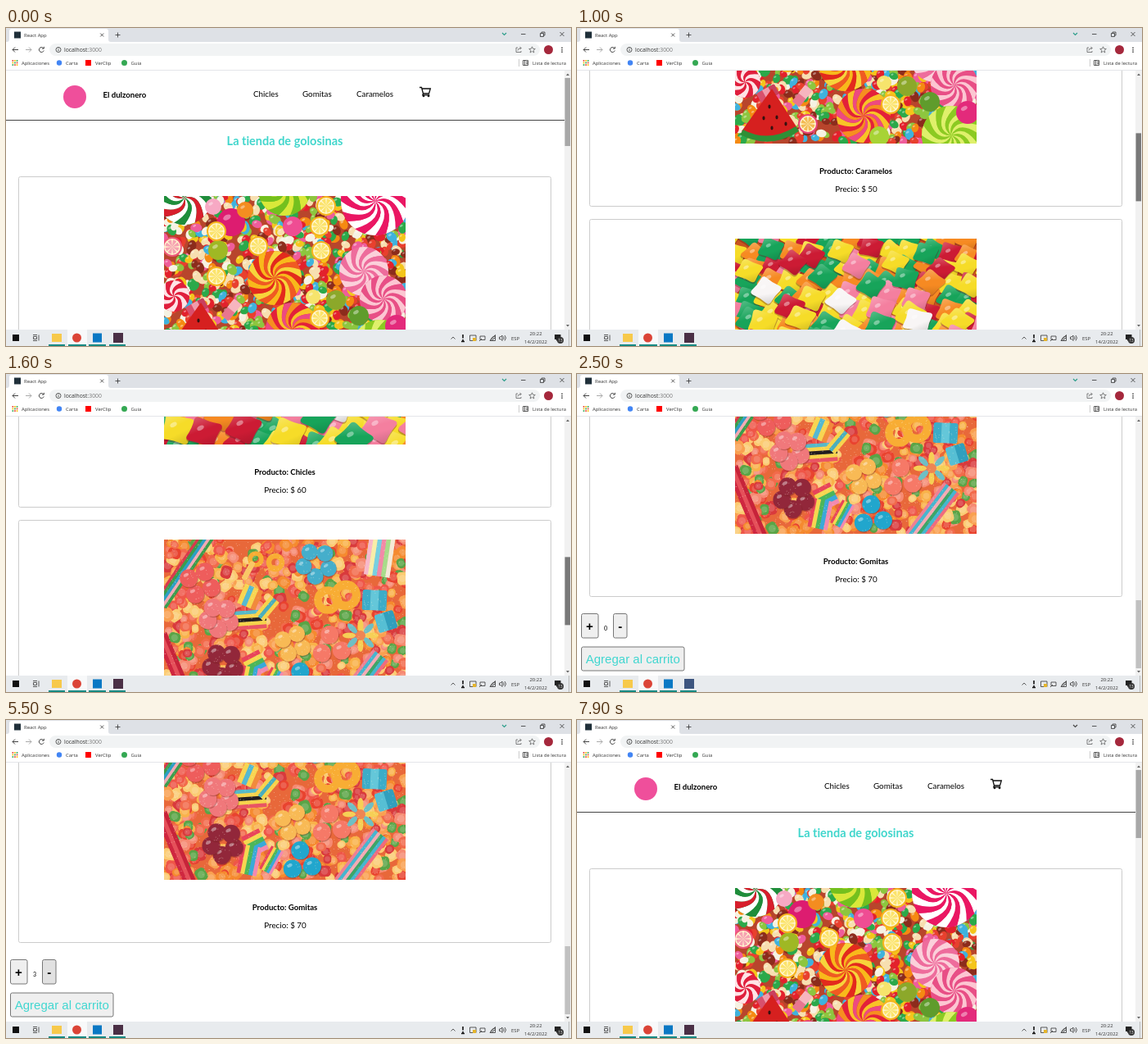
These frames come from a looping animation (690 by 388 pixels, 8 s). An HTML page with a canvas:

```html
<!DOCTYPE html>
<html lang="es">
<head>
<meta charset="utf-8">
<title>Golosinas</title>
<style>
html, body { margin: 0; width: 690px; height: 388px; overflow: hidden; background: #fff; }
svg, canvas, div { position: absolute; left: 0; top: 0; }
#view { top: 52px; width: 682px; height: 316px; overflow: hidden; }
#page { top: -52px; width: 682px; height: 1200px; will-change: transform; }
canvas { left: 193px; }
.shop { font: 9.8px Lato, "Open Sans", sans-serif; font-variant-ligatures: none; }
.shop .b { font-weight: 700; font-size: 9.6px; }
.ui { font: 5.9px "Open Sans", "Noto Sans", sans-serif; fill: #333; }
.btn { font: 700 15px "Liberation Sans", Arial, sans-serif; }
.line { fill: none; stroke: #444; stroke-width: 1; }
.thin { fill: none; stroke: #333; stroke-width: .8; }
.mid { text-anchor: middle; }
</style>
</head>
<body>
<div id="view">
  <div id="page">
    <svg class="shop" width="682" height="1200">
      <circle cx="84" cy="84" r="14" fill="#ef4f9b"/>
      <text class="b" x="118.5" y="84.5">El dulzonero</text>
      <text x="302" y="83.5">Chicles</text>
      <text x="362" y="83.5">Gomitas</text>
      <text x="428" y="83.5">Caramelos</text>
      <g fill="none" stroke="#111" stroke-width="1.3">
        <path d="M505 72.5h2.5l2 7.500h7l1.800-6H508M509.500 80l-.7 1.800h8.500"/>
        <circle cx="510" cy="83" r=".7"/><circle cx="516" cy="83" r=".7"/>
      </g>
      <path d="M0 112.500H682" stroke="#444"/>
      <text class="mid" x="340.500" y="143" style="font-size:14.5px;font-weight:700" fill="#40d6cc">La tienda de golosinas</text>
      <g id="cards"></g>
      <g stroke="#777">
        <rect id="plus" x="5.500" y="1125.500" width="20.500" height="29.500" rx="2"/>
        <rect id="minus" x="44.500" y="1125.500" width="16.500" height="29.500" rx="2"/>
        <rect x="5.500" y="1166" width="125.500" height="29" rx="2" fill="#efefef"/>
      </g>
      <g class="btn mid">
        <text x="15.500" y="1145.500">+</text>
        <text x="52.800" y="1145.500">-</text>
        <text x="68.300" y="1186" fill="#40d6d0" style="font-weight:400">Agregar al carrito</text>
      </g>
      <text id="count" class="mid" x="35" y="1145.500" style="font-size:7px">0</text>
    </svg>
  </div>
</div>

<svg class="ui" width="690" height="388">
  <!-- browser frame -->
  <rect width="690" height="17" fill="#dee1e6"/>
  <path d="M1 17q3 0 3-3V4q0-3 3-3H122q3 0 3 3v10q0 3 3 3z" fill="#fff"/>
  <rect x="10" y="4.500" width="8" height="8" fill="#20303a"/>
  <text x="22" y="10.700">React App</text>
  <path class="thin" d="M115.200 6.500l4 4m0-4l-4 4M133.500 8.500h6m-3-3v6"/>
  <path id="chevron" d="M606 6l2.500 2.500L611 6" fill="none" stroke-width="1.100"/>
  <path class="thin" d="M629 7.500h5.500M652.500 6.500h4v4h-4zM654 6.500V5h4v4h-1.500M676.500 5l5 5m0-5l-5 5"/>
  <rect y="17" width="690" height="35" fill="#fff"/>
  <rect x="53" y="19" width="599" height="15" rx="7.500" fill="#f1f3f4"/>
  <path class="line" d="M15 26.500H8m3-3l-3 3 3 3"/>
  <path class="line" d="M24 26.500h7m-3-3l3 3-3 3" style="stroke:#aaa"/>
  <path class="line" d="M45.600 24.500a3 3 0 1 0 .6 3M46.300 22.800v2.300H44"/>
  <circle class="thin" cx="64" cy="26.500" r="3"/>
  <path class="thin" d="M64 26v2M64 24.500v.8"/>
  <text x="71" y="28.800" style="font-size:6.800px">localhost<tspan fill="#777">:3000</tspan></text>
  <g style="opacity:.75">
    <path class="thin" d="M625 24h-2v5.500h6V28M625 27.500q0-3 4-3m-1.500-1.700l1.700 1.700-1.700 1.700"/>
    <path class="thin" d="M642.500 22.800l1.100 2.500 2.700.2-2.100 1.800.7 2.700-2.400-1.500-2.400 1.500.7-2.700-2.100-1.800 2.700-.2z"/>
  </g>
  <circle cx="662.500" cy="26.500" r="5.500" fill="#a5283c"/>
  <path d="M679 23.500v6.500" stroke="#444" stroke-width="1.500" stroke-dasharray="1.500 1"/>
  <g id="apps"></g>
  <text x="19" y="44.700">Aplicaciones</text>
  <circle cx="65" cy="42.500" r="3.200" fill="#4285f4"/>
  <text x="73" y="44.700">Carta</text>
  <rect x="97" y="39" width="7" height="7" fill="#f00"/>
  <text x="109" y="44.700">VerClip</text>
  <circle cx="144.500" cy="42.500" r="3.500" fill="#34a853"/>
  <text x="152.500" y="44.700">Guia</text>
  <path d="M626.500 38v9" stroke="#ccc"/>
  <path class="thin" d="M631.500 39.500h6v6h-6zM633.500 39.500v6M635 41.500h2.500M635 43.500h2.500"/>
  <text x="643" y="44.700" style="font-size:5.800px">Lista de lectura</text>
  <path d="M0 51.500H690" stroke="#e4e6e9"/>

  <!-- scrollbar -->
  <rect x="682" y="52" width="8" height="316" fill="#f1f1f1"/>
  <path d="M684 58l2-2.500 2 2.500zM684 362l2 2.500 2-2.500z" fill="#666"/>
  <rect id="thumb" x="682.500" y="61" width="6.500" height="83"/>

  <!-- taskbar -->
  <rect y="368" width="690" height="20" fill="#e8ebee"/>
  <rect x="75" y="368" width="24" height="20" fill="#f8f9fa"/>
  <rect x="8" y="374" width="8" height="8" fill="#111"/>
  <path class="thin" d="M33.500 376.500h4v3h-4zM33 374.500h5M33 381.500h5M40 374.500v7"/>
  <rect x="56" y="373" width="12" height="10" fill="#f7c94b"/>
  <circle cx="86.500" cy="378" r="5.500" fill="#db4437"/>
  <rect x="106" y="372.500" width="11" height="11" fill="#0a78c4"/>
  <rect id="recorder" x="131" y="372" width="12" height="12"/>
  <path d="M52 387H72M76 387H98M101 387H122M126 387H146" stroke="#168a83" stroke-width="2"/>
  <path class="thin" d="M543.500 379.500l2.500-2.500 2.500 2.500"/>
  <path d="M558 374v4.500M558 380v3M556 382.500h4" stroke="#111" stroke-width="1.600"/>
  <path class="thin" d="M566.500 375h7.500v6.500h-7.500zM579 376h6v4.500h-6zM578 382l3-3M592 381.500a6 6 0 0 1 5.500-5.500M594 381.500a4 4 0 0 1 3.500-3.500M591 381.500h6.500v-7zM602.500 377h1.500l2-2v6.500l-2-2h-1.500zM607.500 376.500q1.500 1.700 0 3.500M609 375q3 3 0 6.500"/>
  <rect x="570" y="378" width="4" height="4" fill="#e5b52c"/>
  <text x="617" y="380.500">ESP</text>
  <text class="mid" x="647" y="375.300">20:22</text>
  <text class="mid" x="647" y="384.800">14/2/2022</text>
  <path d="M670 374h7.500v6H674l-2 2v-2h-2z" fill="#222"/>
  <circle cx="677" cy="381" r="4" fill="#333"/>
  <text class="mid" x="677" y="382.800" style="font-size:4.500px;fill:#fff">13</text>
  <path d="M687.500 368v20" stroke="#bbb"/>
</svg>

<script>
const LOOP = 8000, STEP = 100, PITCH = 313, BOTTOM = 833, TRAVEL = 215 / BOTTOM;
const W = 295, H = 197, TAU = Math.PI * 2;
const $ = id => document.getElementById(id);

// Cards, bookmark grid
const products = [['Caramelos', 50], ['Chicles', 60], ['Gomitas', 70]];
$('cards').innerHTML = products.map(([name, price], i) => {
  const y = 181 + i * PITCH;
  return `<rect x="15.5" y="${y + .5}" width="650" height="297" rx="2" fill="none" stroke="#ccc"/>
    <text class="b mid" x="340.500" y="${y + 258}">Producto: ${name}</text>
    <text class="mid" x="341" y="${y + 280}">Precio: $ ${price}</text>`;
}).join('');
const dots = ['#ea4335', '#fbbc04', '#34a853'];
$('apps').innerHTML = Array.from({ length: 9 }, (_, i) =>
  `<rect x="${7.5 + i % 3 * 2.6}" y="${39 + (i / 3 | 0) * 2.6}" width="1.7" height="1.7" fill="${dots[(i + (i / 3 | 0)) % 3]}"/>`).join('');

// Sweets, drawn once
let g, seed;
const rnd = () => (seed = (seed * 16807) % 2147483647) / 2147483647;
const pick = list => list[rnd() * list.length | 0];

function photo(i, base, draw) {
  const c = document.createElement('canvas');
  c.width = W; c.height = H;
  c.style.top = 205 + i * PITCH + 'px';
  $('page').append(c);
  g = c.getContext('2d');
  seed = 4231 + i * 977;
  g.fillStyle = base;
  g.fillRect(0, 0, W, H);
  draw();
}
function ball(x, y, r, color, ry = r, turn = 0) {
  g.fillStyle = color;
  g.beginPath(); g.ellipse(x, y, r, ry, turn, 0, TAU); g.fill();
}
function shine(x, y, r) { ball(x - r * .3, y - r * .35, r * .3, '#ffffff66', r * .18, -.5); }
function swirl(x, y, r, colors, n = 14) {
  ball(x, y, r, colors[0]);
  const edge = (a, k) => [x + Math.cos(a) * r * k, y + Math.sin(a) * r * k];
  for (let i = 0; i < n; i++) {
    const a = i * TAU / n, b = a + TAU / n;
    g.fillStyle = colors[i % colors.length];
    g.beginPath();
    g.moveTo(x, y);
    g.quadraticCurveTo(...edge(a - 1.1, .6), ...edge(a, 1));
    g.arc(x, y, r, a, b);
    g.quadraticCurveTo(...edge(b - 1.1, .6), x, y);
    g.fill();
  }
}
function slice(x, y, rim = '#f6b51e', flesh = '#fbe36a') {
  ball(x, y, 12, rim); ball(x, y, 10, '#fff6cf');
  for (let a = 0; a < TAU - .1; a += TAU / 8) {
    g.fillStyle = flesh;
    g.beginPath(); g.moveTo(x, y); g.arc(x, y, 8.5, a + .1, a + .68); g.fill();
  }
}
function block(x, y, w, h, turn, colors, round = 0) {
  g.save();
  g.translate(x, y); g.rotate(turn);
  g.beginPath(); g.roundRect(-w / 2, -h / 2, w, h, round); g.clip();
  colors.forEach((c, i) => {
    g.fillStyle = c;
    g.fillRect(-w / 2 + i * w / colors.length, -h / 2, w / colors.length + .5, h);
  });
  g.restore();
}
function cluster(x, y, r, color, n, spread) {
  for (let i = 0; i < n; i++) {
    const a = i * TAU / n + .4, bx = x + Math.cos(a) * spread, by = y + Math.sin(a) * spread;
    ball(bx + .8, by + 1.2, r, '#6b201855');
    ball(bx, by, r, color);
    shine(bx, by, r);
  }
}

photo(0, '#b8452c', () => {
  const mix = ['#e3212c', '#f4c51b', '#f58a12', '#2ba94a', '#8dc63f', '#3fb2dd', '#f6f2e2', '#ef5d9b', '#8c2c1c', '#f7dfb0', '#e8402e'];
  for (let i = 0; i < 1100; i++) {
    const x = rnd() * W, y = rnd() * H, r = 5 + rnd() * 2.5;
    ball(x, y, r, pick(mix), r * .75, rnd() * 3);
    shine(x, y, r);
  }
  swirl(25, 2, 33, ['#1f8d3b', '#fff', '#d81e2c', '#fff'], 16);
  swirl(147, -8, 32, ['#74c01e', '#d9e83a']);
  swirl(258, 6, 42, ['#ea1763', '#fff'], 20);
  swirl(12, 122, 19, ['#e01f3d', '#ffe3e6'], 12);
  swirl(244, 92, 30, ['#ee6c9c', '#fbd0da'], 18);
  swirl(268, 126, 29, ['#e84f86', '#fcc6d2'], 18);
  swirl(135, 100, 33, ['#e32a1d', '#f8b91b', '#f05a22', '#f7d43b'], 20);
  swirl(157, 163, 33, ['#e3213a', '#f8c327', '#ed4a81', '#f68f20'], 20);
  swirl(264, 187, 36, ['#8cca22', '#dff06b'], 18);
  [[82, 32, 17, '#dd1c70'], [157, 37, 12, '#ef4d93'], [99, 17, 10, '#f48d20'], [66, 66, 12, '#9fb824'],
   [210, 127, 12, '#8ca82a'], [238, 146, 12, '#5f9c2c'], [284, 159, 14, '#e32a7b'], [60, 13, 10, '#f7a9c4'],
   [182, 123, 9, '#f6e46c'], [176, 188, 12, '#a7d335']].forEach(([x, y, r, c]) => { ball(x, y, r, c); shine(x, y, r); });
  [[64, 43], [190, 37], [115, 61], [192, 67], [64, 98], [190, 149], [198, 12]].forEach(([x, y]) => slice(x, y));
  slice(10, 62, '#ee5a7b', '#f6a2b2');
  slice(89, 173, '#e84477', '#f3bb52');
  block(40, 136, 25, 14, -.5, ['#d8506d', '#f19bac', '#c93f5e'], 2);
  block(82, 139, 26, 12, -.9, ['#e8768f', '#f7b5bf'], 2);
  g.lineWidth = 7; g.strokeStyle = '#2f8f36'; g.fillStyle = '#d6201f';
  g.beginPath(); g.moveTo(45, 130); g.lineTo(76, 178); g.quadraticCurveTo(42, 200, 8, 182); g.fill();
  g.beginPath(); g.moveTo(76, 179); g.quadraticCurveTo(42, 201, 8, 183); g.stroke();
  [[42, 152], [35, 166], [51, 165], [45, 178], [62, 173]].forEach(([x, y]) => ball(x, y, 1.6, '#35110f', 2.4));
});

photo(1, '#c8541f', () => {
  const YELLOW = '#f6dc28', GREEN = '#17a45a', RED = '#cc1b34', PINK = '#f47f9f', ORANGE = '#f68a22', WHITE = '#f8f5f5';
  // Pillow with rounded corners and slightly hollow sides
  const gum = (x, y, color) => {
    const r = 15 + y * .035, turn = .25 + rnd() * .5, flat = .8 + rnd() * .15;
    const at = (k, len) => [Math.cos(k * TAU / 8) * len, Math.sin(k * TAU / 8) * len];
    const pillow = () => {
      g.beginPath();
      for (let k = 1; k < 9; k += 2) {
        g.lineTo(...at(k - .25, r));
        g.quadraticCurveTo(...at(k, r * 1.22), ...at(k + .25, r));
        g.quadraticCurveTo(...at(k + 1, r * .74), ...at(k + 1.75, r));
      }
      g.fill();
    };
    g.save();
    g.translate(x, y); g.scale(1, flat); g.rotate(turn);
    g.save(); g.translate(1, 2); g.fillStyle = '#5b101955'; pillow(); g.restore();
    g.fillStyle = color; pillow();
    const light = g.createLinearGradient(-r, -r, r, r);
    light.addColorStop(0, '#ffffff55'); light.addColorStop(.45, '#ffffff00');
    light.addColorStop(.6, '#00000000'); light.addColorStop(1, '#00000030');
    g.fillStyle = light; pillow();
    g.restore();
    shine(x, y, r * .7);
  };
  const mix = [YELLOW, YELLOW, RED, GREEN, PINK, ORANGE];
  for (let y = -4; y < 212; y += 18)
    for (let x = -8; x < 308; x += 24) gum(x + rnd() * 10, y + rnd() * 8, pick(mix));
  const placed = {
    [GREEN]: [44, 12, 233, 18, 107, 46, 166, 57, 208, 49, 20, 100, 104, 125, 177, 107, 244, 134, 189, 164, 55, 134, 232, 190],
    [YELLOW]: [17, 39, 129, 15, 196, 29, 93, 73, 288, 57, 215, 94, 34, 103, 80, 97, 272, 101, 165, 135, 258, 156, 16, 178, 152, 184],
    [RED]: [71, 29, 93, 21, 166, 11, 251, 37, 67, 84, 27, 128, 49, 182, 97, 176],
    [PINK]: [148, 33, 221, 74, 178, 86, 272, 123, 165, 158, 262, 176],
    [ORANGE]: [239, 53, 119, 150, 71, 162],
    [WHITE]: [38, 63, 129, 76, 135, 116, 211, 153, 223, 100]
  };
  const gums = Object.entries(placed).flatMap(([color, p]) =>
    p.flatMap((x, i) => i % 2 ? [] : [[x, p[i + 1], color]]));
  gums.sort((a, b) => a[1] - b[1]).forEach(one => gum(...one));
});

photo(2, '#e8683a', () => {
  const mix = ['#f58a2f', '#f9b24a', '#e9432f', '#f26a4b', '#fbcb72', '#5aa446', '#d93a3c', '#f68a72', '#f9a050', '#ef5648'];
  for (let i = 0; i < 650; i++) {
    const x = rnd() * W, y = rnd() * H, s = 10 + rnd() * 7;
    block(x, y, s, s * .85, rnd() * 3, [pick(mix)], 5);
    ball(x, y, s * .28, '#ffffff2a');
  }
  const rainbow = ['#e8445a', '#f6d650', '#4cb65a', '#3aa9d8', '#f28ab0'];
  block(25, 36, 18, 105, .6, ['#d83a4c', '#3b9d4d', '#2c9fc4', '#f3a9b4', '#3b9d4d']);
  block(264, 15, 32, 60, .15, ['#f7b9cb', '#f8eda8', '#77cfe0', '#f28aa8', '#a8dc8a', '#f5e9d8']);
  block(241, 172, 24, 78, .65, ['#ee8093', '#45b6cf', '#f3aab5', '#3da568', '#45b6cf', '#ee6b7f']);
  block(14, 158, 15, 92, -.4, ['#cf2740', '#e5505a', '#c7233a']);
  block(105, 70, 24, 26, .4, ['#f7d552', '#54b9d2', '#f7d552', '#f18a3c']);
  block(103, 98, 23, 44, 1.5, ['#56b9c9', '#f6d34c', '#221d20', '#f6d34c', '#e95564']);
  block(126, 84, 14, 30, .7, ['#f6d34c', '#49aebd', '#f6d34c']);
  block(111, 152, 28, 24, 1.1, rainbow);
  block(104, 173, 25, 36, .2, rainbow);
  block(131, 173, 17, 32, .5, rainbow);
  cluster(186, 29, 10, '#45aecb', 5, 16);
  cluster(44, 53, 11, '#ee5d5c', 4, 15);
  cluster(67, 95, 11, '#f0787b', 5, 14);
  cluster(72, 152, 11, '#92273a', 5, 15);
  cluster(157, 127, 10, '#f8ba55', 4, 13);
  cluster(168, 175, 11, '#21a6cd', 3, 14);
  cluster(204, 130, 11, '#f67967', 3, 14);
  g.strokeStyle = '#f8ad34';
  [[200, 74, 12], [222, 68, 13], [112, 24, 7], [136, 28, 8]].forEach(([x, y, r]) => {
    g.lineWidth = r * .8;
    g.beginPath(); g.arc(x, y, r, 0, TAU); g.stroke();
  });
  block(103, 38, 7, 25, .5, ['#f9c766'], 3);
  block(257, 74, 30, 25, .05, ['#3cacc8', '#64c7d9', '#3cacc8'], 3);
  block(271, 100, 24, 23, -.3, ['#56bfd4', '#319fbd'], 3);
  for (let a = 0; a < TAU; a += TAU / 8)
    ball(240 + Math.cos(a) * 14, 117 + Math.sin(a) * 12, 8, a % 1.5 < .7 ? '#f6cf55' : '#6fbfc4', 3.5, a);
  ball(240, 117, 6, '#ee8554');
  for (let i = 0; i < 1400; i++) ball(rnd() * W, rnd() * H, .5, '#fff4dc77');
});

// Timeline: a value holds until the next entry
const hold = (t, track) => track.reduce((v, [at, next]) => t >= at ? next : v, track[0][1]);
function ramp(t, track) {
  const i = track.findIndex(([at]) => at > t);
  const [t0, a] = track[i - 1], [t1, b] = track[i];
  return a + (b - a) * (t - t0) / (t1 - t0);
}
const REST = '#efefef', HOVER = '#e1e1e1';
const scrollTrack = [[0, 0], [200, 0], [1000, 261], [1600, 629], [1800, BOTTOM], [7200, BOTTOM], [7300, 543], [7700, 0], [LOOP, 0]];
const countTrack = [[0, 0], [3600, 1], [3800, 2], [4000, 3], [4300, 4], [4800, 5], [5300, 4], [5500, 3], [5700, 2], [5800, 1], [6000, 0]];
const fills = {
  plus: [[0, REST], [3300, HOVER], [4500, REST], [4600, HOVER], [4900, REST]],
  minus: [[0, REST], [3000, HOVER], [3200, REST], [5000, HOVER], [6200, REST]],
  thumb: [[0, '#a8a8a8'], [100, '#787878'], [2200, '#a8a8a8'], [2500, '#c1c1c1'], [6700, '#a8a8a8'], [7000, '#787878'], [7700, '#a8a8a8']],
  recorder: [[0, '#4a2f45'], [2000, '#3d557f'], [3000, '#4a2f45'], [4000, '#3d557f'], [5000, '#4a2f45'], [6000, '#3d557f'], [7000, '#4a2f45']]
};

const start = performance.now();
function frame() {
  const t = Math.floor((performance.now() - start) % LOOP / STEP) * STEP;
  const y = ramp(t, scrollTrack);
  $('page').style.transform = `translateY(${-Math.round(y)}px)`;
  $('thumb').setAttribute('y', 61 + y * TRAVEL);
  $('count').textContent = hold(t, countTrack);
  for (const id in fills) $(id).setAttribute('fill', hold(t, fills[id]));
  $('chevron').setAttribute('stroke', t < 7700 ? '#2a9d8a' : '#444');
  requestAnimationFrame(frame);
}
frame();
</script>
</body>
</html>
```
